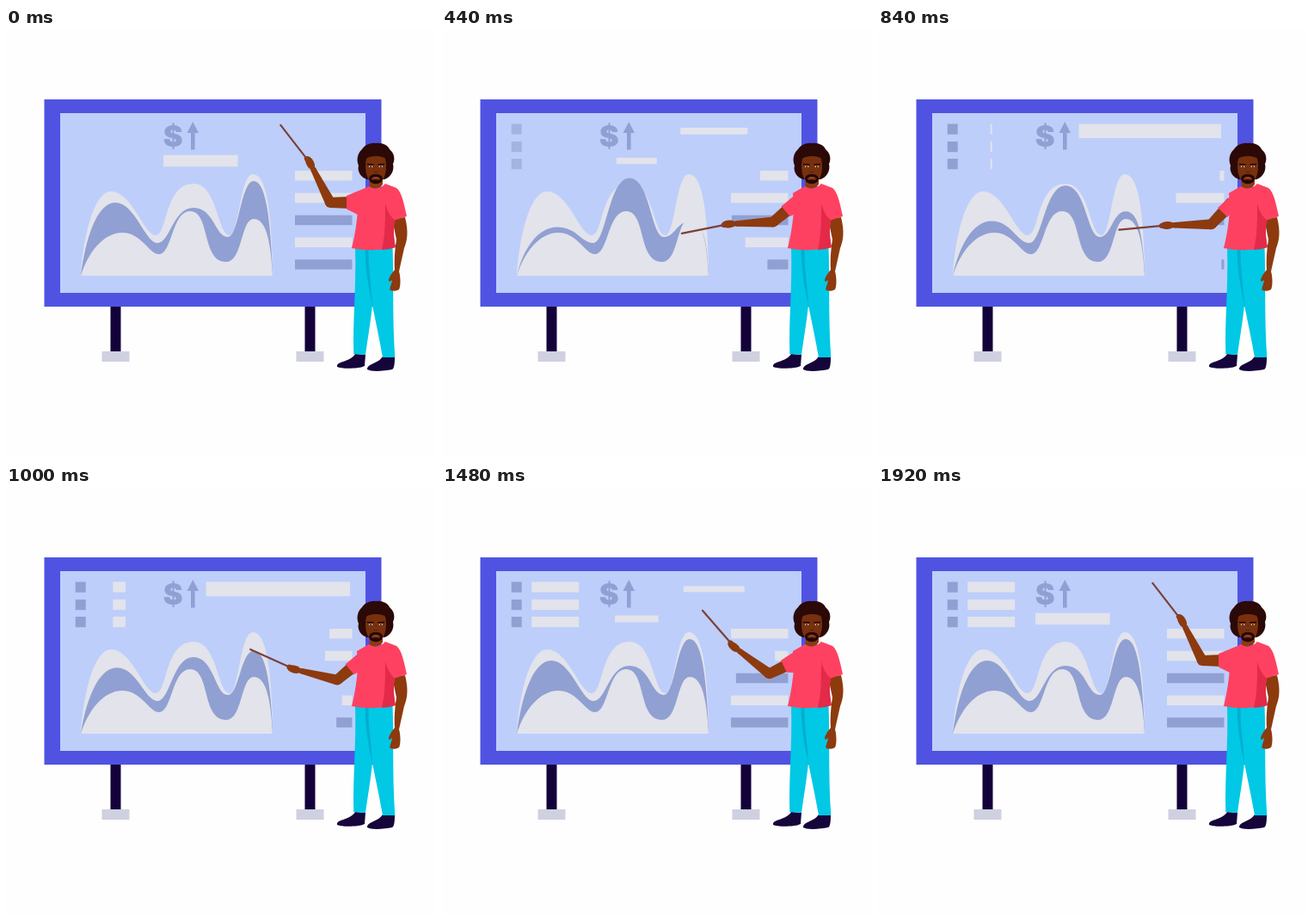
Write an HTML page with a canvas that moves like this. It is 500 by 500 pixels and loops after 1.96 s.

```html
<!DOCTYPE html>
<html lang="en">
<head>
<meta charset="utf-8">
<title>Presentation</title>
<style>
html, body { margin: 0; width: 100%; height: 100%; overflow: hidden; background: #fefefe; }
canvas { display: block; }
</style>
</head>
<body>
<canvas id="stage" width="500" height="500"></canvas>
<script>
const ctx = document.getElementById('stage').getContext('2d');
const LOOP = 1960, STEP = 40;
const LIGHT = '#e2e3eb', BLUE = '#91a0d2', SKIN = '#8d3a0e', SHIRT = '#ff4161', DARK = '#16053a';

// Eased progress between two times
function ease(t, from, to) {
  const s = Math.min(1, Math.max(0, (t - from) / (to - from)));
  return s * s * (3 - 2 * s);
}
// Rises from 0 to 1 and falls back
const pulse = (t, a, b, c) => t < b ? ease(t, a, b) : 1 - ease(t, b, c);

// Smooth curve through keyed values, without overshoot
function track(times, vals) {
  const last = times.length - 1;
  const rate = i => (vals[i + 1] - vals[i]) / (times[i + 1] - times[i]);
  const slope = vals.map((v, i) => {
    if (i === 0 || i === last) return 0;
    const a = rate(i - 1), b = rate(i);
    return a * b <= 0 ? 0 : 2 * a * b / (a + b);
  });
  return t => {
    if (t >= times[last]) return vals[last];
    let i = 0;
    while (t >= times[i + 1]) i++;
    const d = times[i + 1] - times[i], s = (t - times[i]) / d, r = 1 - s;
    return r * r * (1 + 2 * s) * vals[i] + s * s * (3 - 2 * s) * vals[i + 1]
      + d * s * r * (r * slope[i] - s * slope[i + 1]);
  };
}

const KEYS = [0, 440, 680, 1000, 1160, 1480, 1920];
const upperArm = track(KEYS, [0, -40, -50, -40, -37, -26, 0]);
const foreArm = track(KEYS, [63, -2.7, -11, 14, 25, 37.4, 63]);
const pointer = track(KEYS, [52.2, -11.3, -23.9, 24.2, 44.9, 49, 52.2]);

function rect(color, x, y, w, h) {
  ctx.fillStyle = color;
  ctx.fillRect(x, y, w, h);
}
function shape(color, d) {
  ctx.fillStyle = color;
  ctx.fill(new Path2D(d));
}
function line(color, width, d) {
  ctx.strokeStyle = color;
  ctx.lineWidth = width;
  ctx.lineCap = 'round';
  ctx.stroke(new Path2D(d));
}
function poly(color, pts) {
  ctx.fillStyle = color;
  ctx.beginPath();
  pts.forEach(p => ctx.lineTo(p[0], p[1]));
  ctx.closePath();
  ctx.fill();
}
function disc(color, x, y, rx, ry = rx, turn = 0) {
  ctx.fillStyle = color;
  ctx.beginPath();
  ctx.ellipse(x, y, rx, ry, turn, 0, Math.PI * 2);
  ctx.fill();
}
function centred(color, cx, cy, w, h) {
  if (w > 0) rect(color, cx - w / 2, cy - h / 2, w, h);
}

function board() {
  rect('#5053e1', 44.5, 83, 392, 241);
  rect('#bdcefb', 63, 99, 355, 209);
  for (const x of [121.5, 347.5]) {
    rect('#13013a', x, 324, 12, 52);
    rect('#cfd0e0', x - 10, 376, 32, 12);
  }
}

function dollar() {
  const font = px => `900 ${px}px Inter, "Liberation Sans", sans-serif`;
  ctx.font = font(100);
  const m = ctx.measureText('$');
  const size = 32 / (m.actualBoundingBoxAscent + m.actualBoundingBoxDescent);
  const mid = (m.actualBoundingBoxRight - m.actualBoundingBoxLeft) / 2;
  ctx.font = font(100 * size);
  ctx.fillStyle = BLUE;
  ctx.fillText('$', 194 - mid * size, 141.3 - m.actualBoundingBoxDescent * size);
  poly(BLUE, [[210.5, 122], [217.3, 109], [224, 122], [219.6, 122], [219.6, 141.5], [215, 141.5], [215, 122]]);
}

function bars(t) {
  const list = ease(t, 760, 1470);
  ctx.globalAlpha = ease(t, 200, 640);
  for (const y of [111.5, 132, 152]) rect(BLUE, 80.7, y, 12, 12.2);
  ctx.globalAlpha = 1;
  for (const y of [117.5, 138, 158]) centred(LIGHT, 131.7, y, 55 * list, 12.2);

  const top = pulse(t, 0, 930, 1920), mid = 1 - pulse(t, 0, 935, 1915);
  centred(LIGHT, 316.3, 119.8, 170 * top, 17 * top);
  centred(LIGHT, 226.3, 154.5, 86.5 * mid, 13.5 * mid);

  const rows = [
    [LIGHT, 166, 138, 735, 1350],
    [LIGHT, 191.8, 690, 1290, 1900],
    [BLUE, 217.7, 400, 990, 1590],
    [LIGHT, 243.5, 246, 840, 1438],
    [BLUE, 269.2, 0, 742, 1488]
  ];
  for (const [color, y, a, b, c] of rows) {
    const w = 66.5 * (1 - pulse(t, a, b, c));
    rect(color, 402.5 - w, y, w, 11.5);
  }
}

function waves(t) {
  const m = pulse(t, 0, 590, 1195);
  const x1 = 127 + 8 * m, y1 = 203 + 34 * m, y2 = 209 - 41 * m, y3 = 178 + 56 * m;
  shape(LIGHT, `M87 288C90 240 103 190 122 190C147 190 160 241 174 241C188 241 184 181 218 181
    C246 181 246 241 260 241C271 241 272 170 287 170C305 170 309 225 310.5 288Z`);
  shape(BLUE, `M87 288C${92 + 3 * m} ${248 + 10 * m} ${105 + 8 * m} ${y1} ${x1} ${y1}
    C${150 + 8 * m} ${y1} 162 250 176 250C191 250 194 ${y2} 218 ${y2}
    C242 ${y2} 243 243 258 243C271 243 273 ${y3} 288 ${y3}
    C304 ${y3} 308 ${235 + 15 * m} 310.3 288Z`);
  shape(LIGHT, `M87 288C95 262 113 238 135 238C158 238 166 263 178 263C193 263 193 213 214 213
    C238 213 227 272 256 272C275 272 273 222 288 222C303 222 308 250 310 288Z`);
}

function reach(p, deg, len) {
  const a = deg * Math.PI / 180;
  return [p[0] - len * Math.cos(a), p[1] - len * Math.sin(a)];
}
// Tapered segment from a to b
function limb(a, b, ra, rb) {
  const dx = b[0] - a[0], dy = b[1] - a[1], len = Math.hypot(dx, dy);
  const nx = -dy / len, ny = dx / len;
  poly(SKIN, [
    [a[0] + nx * ra, a[1] + ny * ra], [b[0] + nx * rb, b[1] + ny * rb],
    [b[0] - nx * rb, b[1] - ny * rb], [a[0] - nx * ra, a[1] - ny * ra]
  ]);
  disc(SKIN, b[0], b[1], rb);
}

function pointingArm(t) {
  const up = upperArm(t), fore = foreArm(t), aim = pointer(t);
  const shoulder = [412, 203];
  const elbow = reach(shoulder, up, 35);
  const hand = reach(elbow, fore, 51.5);
  const wrist = reach(elbow, fore, 43);
  const tip = reach(hand, aim, 56);

  limb(shoulder, elbow, 7.5, 6);
  limb(elbow, wrist, 6, 3.2);
  disc(SKIN, hand[0], hand[1], 8.5, 4.5, fore * Math.PI / 180);
  disc(SKIN, ...reach(hand, aim, 5), 4.5, 3, aim * Math.PI / 180);
  line('#7d4036', 2.2, `M${hand}L${tip}`);
  disc(SKIN, ...reach(hand, aim, 2), 3.6, 3.2);

  const cuff = reach(shoulder, up, 16);
  poly(SHIRT, [[423, 184], reach(cuff, up + 90, 8), reach(cuff, up - 90, 7.5), [409, 217], [428, 215]]);
}

function legs() {
  shape(DARK, 'M406 379L418 380L417 393C412 396 391 397 385 394C384 387 400 389 406 379Z');
  shape(DARK, 'M438 382L452 383C452 392 451 396 449 397C440 399 424 400 420 397C420 390 432 391 438 382Z');
  shape('#00c8e5', `M406 255L449.5 255C451 290 449 335 452.3 383L438 383C434 361 430 342 426 322
    C424 342 420 365 418 380L404.3 379C403 340 407.5 300 406 255Z`);
  shape('#00add0', 'M417.5 257L421.5 257C421 280 425 300 426 322C421 300 418 280 417.5 257Z');
}

function restingArm() {
  shape(SKIN, `M449 222L464 220C468 236 467 246 463 256L457 283C459 290 459 300 457 304
    Q453 307 447 305C445 303 448 300 449 293L446 295C443 293 448 286 452 281
    C451 267 453 252 454 246Z`);
}

function torso() {
  shape(SHIRT, `M422 184C428 188 436 187 441 181L454 186C460 190 463 205 466 219L452 223.5
    C450 234 451 245 453 255Q428 261 402 256C406 240 408 225 409 212L408 192Z`);
  shape('#e32a49', 'M441 204Q444 217 452 223.5C450 234 451 245 453 255Q445 258 437 258C441 240 441 225 441 204Z');
}

function head() {
  shape(SKIN, 'M423 174L438 174L438 182Q430 190 422.5 184Z');
  shape('#2b0906', `M430 134C437 133 444 136 446 141C451 145 453 152 450 158C452 166 447 174 440 176
    L420 176C413 174 408 167 410 160C407 153 409 145 414 141C417 136 424 133 430 134Z`);
  shape('#78300d', `M419 152C423 148 438 148 441 152C443 161 442 170 438 177
    Q430 185 422 177C418 170 417 161 419 152Z`);
  line('#240604', 1.5, 'M420.5 158.5L427 158.8M433 158.8L439.5 158.5');
  for (const x of [424.2, 435.8]) {
    disc('#d3c6c2', x, 161.2, 2.4, 1.1);
    disc('#240604', x, 161.2, 1);
  }
  line('#56200b', 1, 'M428 167.5Q430 169 432 167.5');
  shape('#240604', `M422 175Q423 170 430 170Q437 170 438 175L436.5 179Q430 183.5 423.5 179Z`);
  shape('#78300d', 'M424.5 175Q430 170.5 435.5 175L434 177Q430 175.5 426 177Z');
  line('#8f4a36', 1.4, 'M427.5 174.3L432.5 174.3');
}

function draw(t) {
  rect('#fefefe', 0, 0, 500, 500);
  board();
  dollar();
  bars(t);
  waves(t);
  legs();
  restingArm();
  pointingArm(t);
  torso();
  head();
}

let start;
function frame(now) {
  if (start === undefined) start = now;
  const t = (now - start) % LOOP;
  draw(Math.floor(t / STEP) * STEP);
  requestAnimationFrame(frame);
}
draw(0);
requestAnimationFrame(frame);
</script>
</body>
</html>
```
